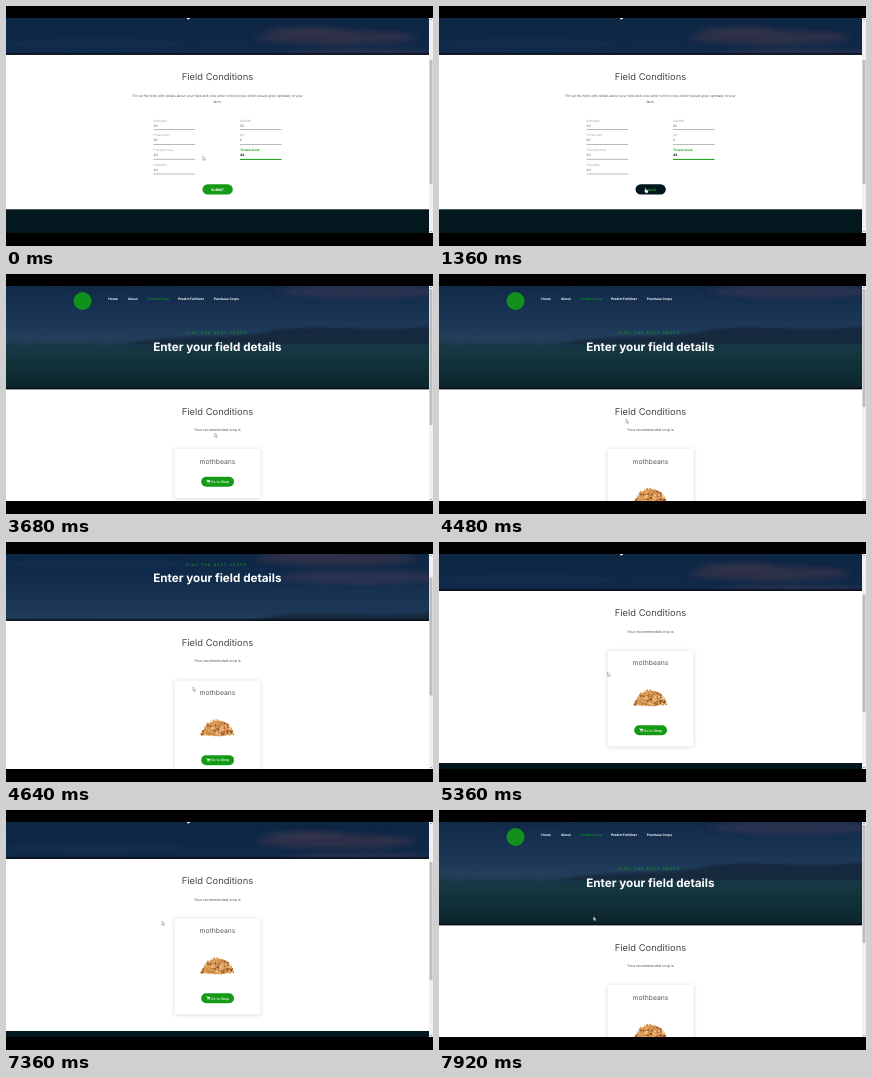
An HTML page for the animation above (8000 ms loop, 427 by 240 pixels).

```html
<!DOCTYPE html>
<html lang="en">
<head>
<meta charset="utf-8">
<title>Field Conditions</title>
<style>
html, body { margin: 0; width: 100%; height: 100%; overflow: hidden; background: #000; }
svg { display: block; width: 100%; height: 100%; }
text { font-family: Inter, "Open Sans", sans-serif; text-rendering: geometricPrecision; }
.mid { text-anchor: middle; }
.nav { font-size: 3.25px; font-weight: 700; fill: #fff; }
.label { font-size: 3.2px; fill: #a3a3a3; }
.value { font-size: 3.2px; fill: #555; }
.focus .label { fill: #149a14; font-weight: 600; }
.focus .value { fill: #111; font-weight: 700; }
</style>
</head>
<body>
<svg viewBox="0 0 427 240" preserveAspectRatio="none">
  <defs>
    <linearGradient id="sky" x1="0" y1="0" x2="0" y2="1">
      <stop offset="0" stop-color="#0b2542"/>
      <stop offset=".28" stop-color="#122a4a"/>
      <stop offset=".5" stop-color="#1a3555"/>
      <stop offset=".63" stop-color="#223d59"/>
      <stop offset=".68" stop-color="#1a3748"/>
      <stop offset=".74" stop-color="#15373f"/>
      <stop offset=".87" stop-color="#102e36"/>
      <stop offset="1" stop-color="#0b2429"/>
    </linearGradient>
    <filter id="blur" x="-30%" y="-80%" width="160%" height="260%"><feGaussianBlur stdDeviation="6 2.5"/></filter>
    <filter id="soft"><feGaussianBlur stdDeviation="1"/></filter>
    <filter id="shade" x="-20%" y="-20%" width="140%" height="140%"><feGaussianBlur stdDeviation="2.2"/></filter>
    <clipPath id="view"><rect y="12" width="427" height="215"/></clipPath>
    <clipPath id="heroBox"><rect width="423" height="115.3"/></clipPath>
  </defs>
  <g clip-path="url(#view)">
    <rect width="427" height="240" fill="#fff"/>
    <g id="page">
      <g clip-path="url(#heroBox)">
        <g id="photo">
          <rect y="-28" width="423" height="144" fill="url(#sky)"/>
          <g filter="url(#blur)">
            <ellipse cx="330" cy="-2" rx="80" ry="7" fill="#4a3a4a" opacity=".5"/>
            <ellipse cx="300" cy="-9" rx="40" ry="3" fill="#5b4650" opacity=".4"/>
            <ellipse cx="355" cy="17" rx="80" ry="7" fill="#3a3a52" opacity=".6"/>
            <ellipse cx="90" cy="4" rx="90" ry="5" fill="#1b3557" opacity=".5"/>
            <ellipse cx="60" cy="66" rx="100" ry="3" fill="#2f4860" opacity=".5"/>
          </g>
          <path d="M120 70Q150 64 200 63T265 57T340 54T430 52V70Z" fill="#13263a" opacity=".85" filter="url(#soft)"/>
        </g>
        <rect y="113.8" width="423" height="2" fill="#070c14"/>
      </g>
      <circle cx="76.5" cy="27" r="9" fill="#0f911b"/>
      <g class="nav">
        <text x="102.3" y="26.2">Home</text>
        <text x="122" y="26.2">About</text>
        <text x="141.3" y="26.2" fill="#12a01c" font-weight="500" font-size="3.1">Find Best Crop</text>
        <text x="172" y="26.2">Predict Fertilizer</text>
        <text x="207.8" y="26.2">Purchase Crops</text>
      </g>
      <text x="180" y="60.4" font-size="3.4" font-weight="500" letter-spacing="1.25" fill="#16a51c">FIND THE BEST CROPS</text>
      <text class="mid" x="211.3" y="77" font-size="11.7" font-weight="700" fill="#fff">Enter your field details</text>
      <text class="mid" x="211.5" y="140.7" font-size="9.4" fill="#45484b">Field Conditions</text>

      <g id="form">
        <g class="mid" font-size="3.33" fill="#555">
          <text x="211.5" y="157">Fill out the form with details about your field and click enter to find crops which would grow optimally in your</text>
          <text x="211.5" y="163.2">farm.</text>
        </g>
        <g id="fields"></g>
        <rect id="submit" x="196.5" y="244.7" width="30.3" height="10.4" rx="5.2"/>
        <text id="submitText" class="mid" x="211.6" y="251.1" font-size="3.3" font-weight="700"></text>
        <rect y="269.8" width="423" height="120" fill="#03171f"/>
      </g>

      <g id="result">
        <text class="mid" x="211.5" y="157" font-size="3.65" fill="#555">Your recommended crop is</text>
        <rect class="card" x="168.5" y="175.5" width="86" fill="#000" opacity=".16" filter="url(#shade)"/>
        <rect class="card" x="168.5" y="175" width="86" fill="#fff"/>
        <text class="mid" x="211.5" y="189.8" font-size="6.8" fill="#5a5a5a">mothbeans</text>
        <g id="beans"></g>
        <g id="buy">
          <rect x="195.2" y="202.7" width="32.8" height="10" rx="5" fill="#149a14"/>
          <path d="M200.3 206h.8l.6 2h2l.5-1.5h-2.8z" fill="#fff" stroke="#fff" stroke-width=".3"/>
          <circle cx="201.9" cy="209" r=".45" fill="#fff"/><circle cx="203.4" cy="209" r=".45" fill="#fff"/>
          <text x="205" y="209" font-size="3.45" font-weight="500" fill="#fff">Go to Shop</text>
        </g>
        <rect id="foot" width="423" height="120" fill="#03171f"/>
      </g>
    </g>

    <rect x="423" y="11" width="4" height="217" fill="#f1f1f1"/>
    <path d="M424 14l1-1.3 1 1.3zM424 225l1 1.3 1-1.3z" fill="#777"/>
    <rect id="thumb" x="423.5" width="3" fill="#bdbdbd"/>
    <g id="cursor" stroke="#555" stroke-width=".35" fill="#fff">
      <path id="arrow" d="M0 0V4L.95 3.2 1.6 4.7 2.2 4.4 1.6 3H2.8Z"/>
      <path id="hand" d="M.2.4Q.7-.2 1.1.4V1.8L3 2.3Q3.5 2.6 3.3 3.4L2.9 5H.9L-.6 3Q-.3 2.3.2 2.8Z"/>
    </g>
  </g>
</svg>
<script>
const LOOP = 8000, SCROLL = 66.5, PAGE_LOAD = 3600, IMAGE_LOAD = 3840, IMAGE_H = 47;
const $ = id => document.getElementById(id);
const set = (el, attrs) => { for (const k in attrs) el.setAttribute(k, attrs[k]); };
const show = (el, on) => { el.style.display = on ? '' : 'none'; };

// Form fields: two columns, 14.8 px apart
const columns = [
  [147.6, [['Nitrogen', 40], ['Potassium', 20], ['Phosphorous', 40], ['Humidity', 40]]],
  [234, [['Rainfall', 50], ['pH', 6], ['Temperature', 48]]]
];
$('fields').innerHTML = columns.map(([x, rows]) => rows.map(([name, value], i) => {
  const y = 182 + i * 14.8, focus = name === 'Temperature';
  return `<g class="${focus ? 'focus' : ''}">
    <text class="label" x="${x}" y="${y}">${name}</text>
    <text class="value" x="${x}" y="${y + 5}">${value}</text>
    <rect x="${x}" y="${y + 7.8}" width="41.5" height="${focus ? 1 : .6}" fill="${focus ? '#149a14' : '#8a8a8a'}"/></g>`;
}).join('')).join('');

// Heap of beans
let seed = 7;
const rand = () => (seed = seed * 16807 % 2147483647) / 2147483647;
const tones = ['#d9934a', '#c98a45', '#ecbb80', '#b8702f', '#e09a50', '#8a4a24', '#f2cc9c'];
let heap = '<path d="M196 229Q198 220 204 217Q212 213 220 217Q226 221 227 228Q212 233 196 229Z" fill="#d79a58"/>';
for (let i = 0; i < 170; i++) {
  const u = rand() * 2 - 1, top = 229 - 14.5 * (1 - Math.abs(u) ** 3);
  const x = 211.5 + u * 16, y = top + rand() * (231 - top - Math.abs(u) * 2);
  heap += `<ellipse cx="${x}" cy="${y}" rx="1.2" ry=".75" transform="rotate(${rand() * 180} ${x} ${y})" fill="${tones[i % tones.length]}"/>`;
}
$('beans').innerHTML = heap;

const ease = p => p * p * (3 - 2 * p);
const ramp = (t, a, b) => ease(Math.min(1, Math.max(0, (t - a) / (b - a))));

// Pointer path: time, x, y
const path = [
  [0, 196.8, 150], [160, 196.8, 150], [1280, 205.8, 182], [2800, 205.8, 182],
  [3440, 208.7, 159], [3720, 208.7, 159], [4400, 187, 145], [4640, 187, 145],
  [5280, 168.5, 130], [5400, 168.5, 130], [6100, 156, 111], [7400, 156, 111],
  [7840, 154.5, 106.5], [LOOP, 154.5, 106.5]
];
function pointer(t) {
  const i = path.findIndex(k => k[0] > t), [t0, x0, y0] = path[i - 1], [t1, x1, y1] = path[i];
  const p = ramp(t, t0, t1);
  return [x0 + (x1 - x0) * p, y0 + (y1 - y0) * p];
}

function draw(t) {
  const onForm = t < PAGE_LOAD, loaded = t >= IMAGE_LOAD;
  const s = SCROLL * (onForm ? 1 : ramp(t, 4480, 4780) - ramp(t, 7480, 7800));
  set($('page'), { transform: `translate(0 ${-s})` });
  set($('photo'), { transform: `translate(0 ${s * 1.5})` });
  show($('form'), onForm);
  show($('result'), !onForm);

  const extra = loaded ? IMAGE_H : 0;
  show($('beans'), loaded);
  set($('buy'), { transform: `translate(0 ${extra})` });
  document.querySelectorAll('.card').forEach(c => set(c, { height: 49 + extra }));
  set($('foot'), { y: 240.5 + extra });

  const [x, y] = pointer(t);
  const hover = onForm && y > 178 && y < 188.5;
  set($('submit'), { fill: hover ? '#03171f' : '#149a14' });
  set($('submitText'), { fill: hover ? '#16a51c' : '#fff' });
  $('submitText').textContent = hover ? 'Submit' : 'SUBMIT';
  set($('cursor'), { transform: `translate(${x} ${y})` });
  show($('arrow'), !hover);
  show($('hand'), hover);

  const [top, size] = onForm ? [54, 124] : [15 + s * .56, loaded ? 118 : 136];
  set($('thumb'), { y: top, height: size });
}

let start;
function frame(now) {
  start ??= now;
  draw((now - start) % LOOP);
  requestAnimationFrame(frame);
}
draw(0);
requestAnimationFrame(frame);
</script>
</body>
</html>
```
